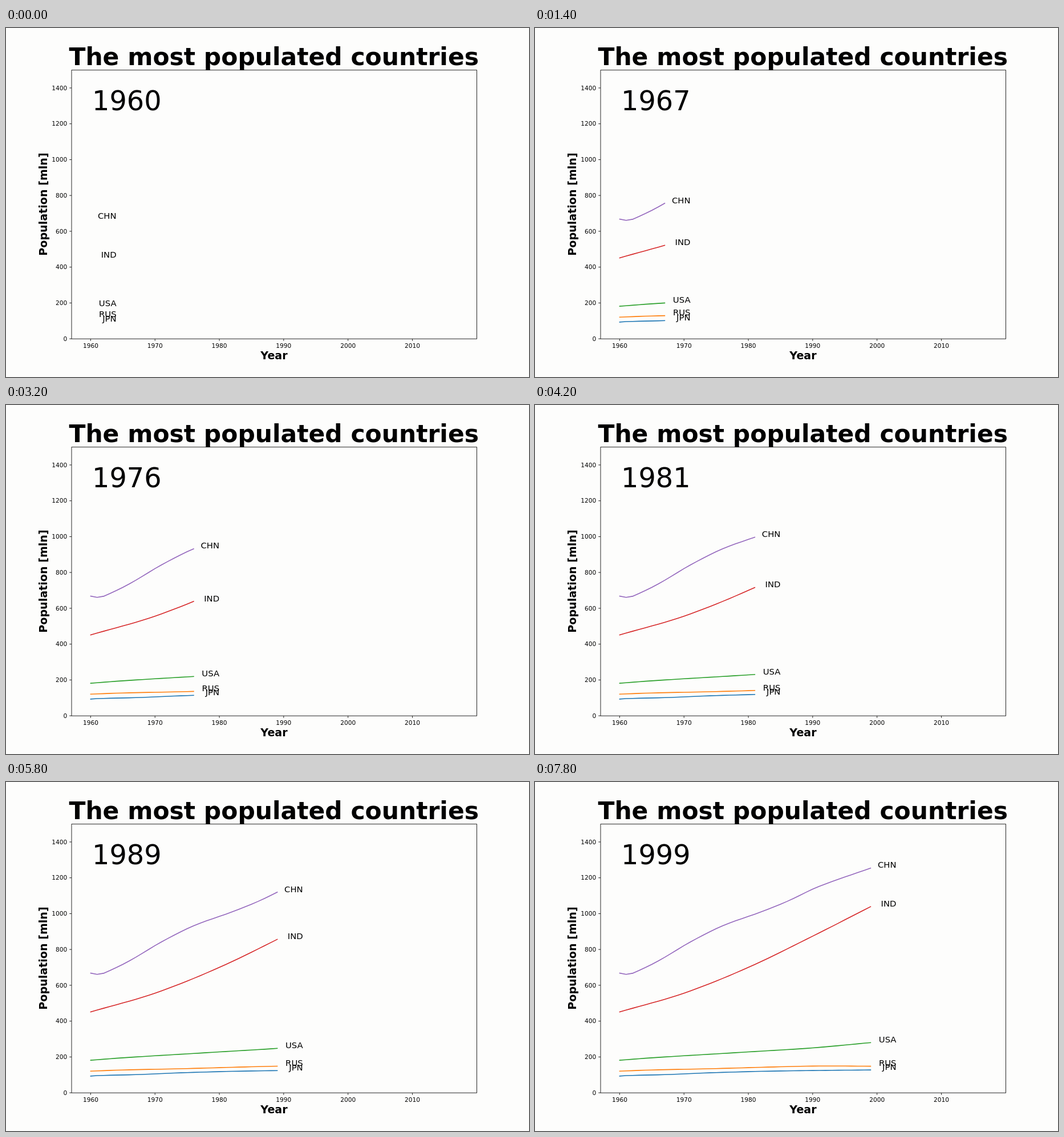
An HTML page with a canvas that plays this animation: 917 px wide and 611 px high, repeating every 8 s.

```html
<!DOCTYPE html>
<html lang="en">
<head>
<meta charset="utf-8">
<title>Population chart</title>
<style>
html, body { margin: 0; width: 100%; height: 100%; overflow: hidden; background: #fdfdfc; }
canvas { display: block; }
</style>
</head>
<body>
<canvas id="chart" width="917" height="611"></canvas>
<script>
const ctx = document.getElementById('chart').getContext('2d');
const LOOP = 8000, STEP = 200, START = 1960;
const POINT = 917 / 12 / 72; // pixels per typographic point
const box = { left: 114.6, right: 825.3, top: 73.3, bottom: 543.8 };

// Key points: [years since START, millions]
const series = [
  { name: 'JPN', color: '#1f77b4',
    keys: [[0, 92.5], [1, 94.9], [8, 101.6], [15, 111.9], [25, 120.8], [39, 126.6]] },
  { name: 'RUS', color: '#ff7f0e',
    keys: [[0, 119.9], [5, 126.3], [15, 134.2], [28, 147], [33, 148.5], [39, 147.2]] },
  { name: 'USA', color: '#2ca02c',
    keys: [[0, 180.7], [5, 194.3], [20, 227.2], [30, 249.6], [39, 279]] },
  { name: 'IND', color: '#d62728',
    keys: [[0, 450.5], [10, 555.2], [20, 699], [30, 873.3], [39, 1038]] },
  { name: 'CHN', color: '#9467bd',
    keys: [[0, 667], [1, 660], [2, 666], [6, 735], [11, 841], [16, 931],
      [22, 1009], [26, 1067], [31, 1151], [39, 1253]] }
];

const xOf = year => box.left + (year - 1957) / 63 * (box.right - box.left);
const yOf = value => box.bottom - value / 1500 * (box.bottom - box.top);

function slopeAt(keys, i) {
  const [t0, v0] = keys[Math.max(i - 1, 0)];
  const [t1, v1] = keys[Math.min(i + 1, keys.length - 1)];
  return (v1 - v0) / (t1 - t0);
}

// Cubic Hermite curve through the key points
function valueAt({ keys }, year) {
  const t = year - START;
  const i = Math.max(1, keys.findIndex(key => key[0] >= t));
  const [t0, v0] = keys[i - 1], [t1, v1] = keys[i];
  const span = t1 - t0, u = (t - t0) / span, w = 1 - u;
  return v0 * w * w * (1 + 2 * u) + v1 * u * u * (1 + 2 * w)
    + span * u * w * (slopeAt(keys, i - 1) * w - slopeAt(keys, i) * u);
}

function text(str, x, y, points, align = 'center', weight = 'normal') {
  ctx.font = `${weight} ${points * POINT}px "DejaVu Sans", sans-serif`;
  ctx.textAlign = align;
  ctx.fillText(str, x, y);
}

function drawAxes() {
  ctx.fillStyle = ctx.strokeStyle = '#000';
  ctx.lineWidth = 0.8 * POINT;
  ctx.lineCap = 'butt';
  ctx.lineJoin = 'miter';
  ctx.strokeRect(115, 73.7, 710.5, 470.5);
  ctx.beginPath();
  for (let year = 1960; year <= 2010; year += 10) {
    const x = xOf(year);
    ctx.moveTo(x, 544.2);
    ctx.lineTo(x, 547.9);
    text(year, x, 559.8, 10);
  }
  for (let value = 0; value <= 1400; value += 200) {
    const y = yOf(value);
    ctx.moveTo(111.2, y + 0.3);
    ctx.lineTo(115, y + 0.3);
    text(value, 107.2, y + 4, 10, 'right');
  }
  ctx.stroke();

  text('The most populated countries', 469.7, 64.7, 40, 'center', 'bold');
  text('Year', 470, 580.2, 18, 'center', 'bold');
  ctx.save();
  ctx.translate(72.3, 308.5);
  ctx.rotate(-Math.PI / 2);
  text('Population [mln]', 0, 0, 18, 'center', 'bold');
  ctx.restore();
}

function drawLine(item, lastYear) {
  ctx.strokeStyle = item.color;
  ctx.lineWidth = 1.5 * POINT;
  ctx.lineCap = 'square';
  ctx.lineJoin = 'round';
  ctx.beginPath();
  for (let year = START; year <= lastYear; year++) {
    ctx.lineTo(xOf(year), yOf(valueAt(item, year)));
  }
  ctx.stroke();
}

function draw(time) {
  const year = START + Math.floor(time % LOOP / STEP);
  ctx.fillStyle = '#fdfdfc';
  ctx.fillRect(0, 0, 917, 611);
  drawAxes();
  if (year > START) series.forEach(item => drawLine(item, year));
  for (const item of series) {
    text(item.name, xOf(year + 4), yOf(valueAt(item, year)) - 0.3, 14, 'right');
  }
  text(year, xOf(1971), 144, 45, 'right');
}

const begin = performance.now();
function tick() {
  draw(performance.now() - begin);
  requestAnimationFrame(tick);
}
tick();
</script>
</body>
</html>
```
